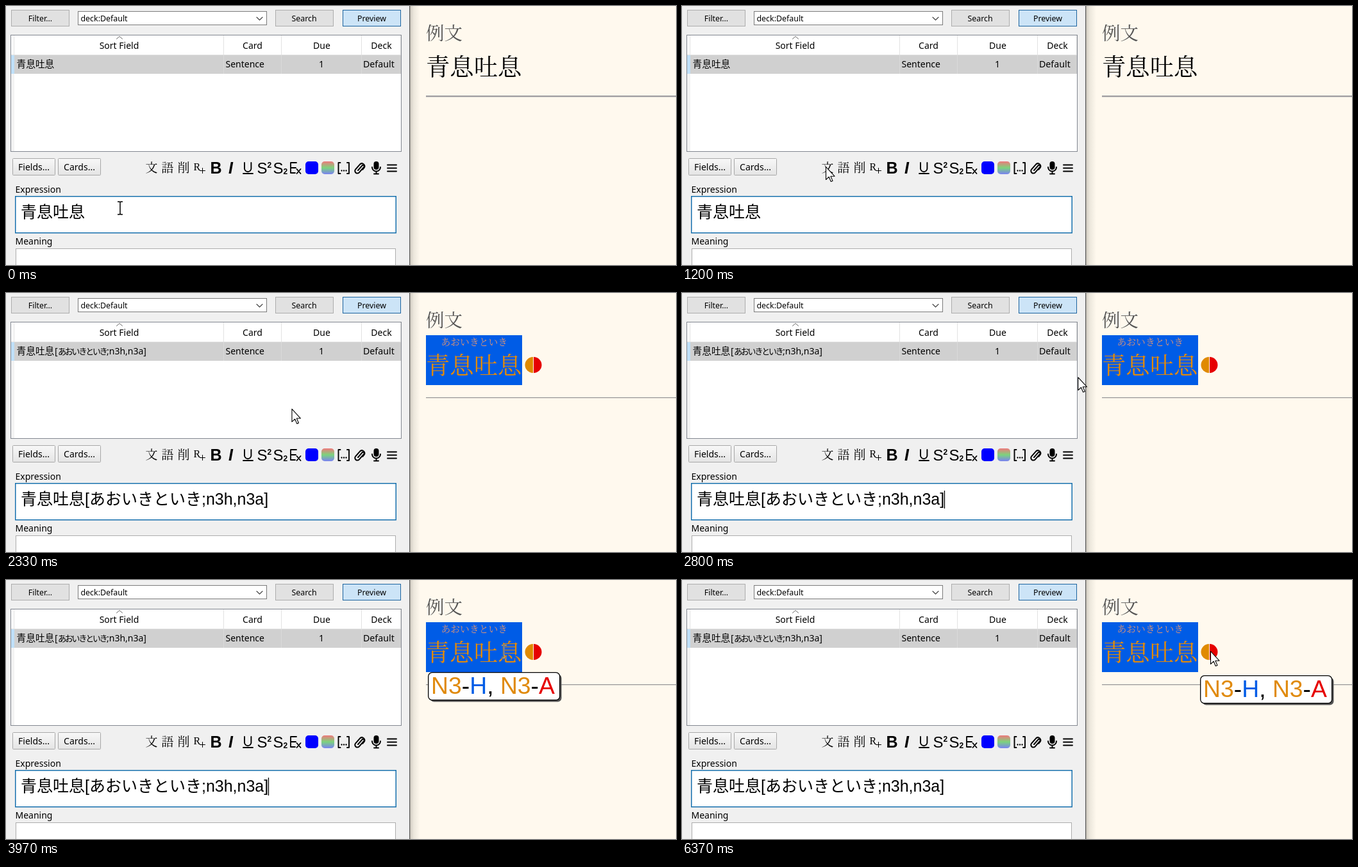
Recreate the animation shown at these times as an HTML page. Size 1045 by 405 pixels, loop 6460 ms.

```html
<!DOCTYPE html>
<html lang="ja">
<head>
<meta charset="utf-8">
<title>Card browser</title>
<style>
  html, body { margin: 0; width: 100%; height: 100%; overflow: hidden; background: #f0f0f0; }
  svg { display: block; width: 1045px; height: 405px; }
  text { font-family: "Noto Sans", "Noto Sans CJK JP", sans-serif; font-size: 14px; fill: #000; }
  .small { font-size: 12.4px; }
  .mid { text-anchor: middle; }
  .field { font: 300 25px "Liberation Sans", "Noto Sans CJK JP", sans-serif; }
  .card { font-family: "Noto Serif CJK JP", "Noto Sans CJK JP", serif; font-size: 37.33px; }
  .icon { font-family: "Liberation Sans", sans-serif; font-size: 24px; }
  .kai { font-family: "Noto Serif CJK JP", "Noto Sans CJK JP", serif; font-size: 19px; }
  .tip { font-family: "Liberation Sans", sans-serif; font-size: 37.33px; }
  .line { fill: none; stroke: #000; stroke-linecap: round; stroke-linejoin: round; }
</style>
</head>
<body>
<svg viewBox="0 0 1045 405">
  <defs>
    <linearGradient id="btn" x2="0" y2="1">
      <stop stop-color="#f8f8f8"/><stop offset="1" stop-color="#e4e4e4"/>
    </linearGradient>
    <linearGradient id="rainbow" x2="0" y2="1">
      <stop stop-color="#f0787c"/><stop offset=".5" stop-color="#7cd47c"/><stop offset="1" stop-color="#7a82f2"/>
    </linearGradient>
    <linearGradient id="shade">
      <stop stop-color="#cfcac0"/><stop offset=".35" stop-color="#ebe6db"/><stop offset="1" stop-color="#fff9ee"/>
    </linearGradient>
  </defs>
  <rect width="1045" height="405" fill="#f0f0f0"/>

  <!-- search bar -->
  <g stroke="#adadad" fill="#e1e1e1">
    <rect x="8.5" y="6.5" width="90" height="25"/>
    <rect x="420.5" y="6.5" width="90" height="25"/>
    <rect x="525.5" y="6.5" width="90" height="25" fill="#cce4f7" stroke="#1c64a0"/>
    <rect x="112.5" y="8.5" width="294" height="21" fill="#fff" stroke="#7a7a7a"/>
  </g>
  <path class="line" d="M391 17.5l4.5 4.5 4.5-4.5" stroke-width="1.1" style="stroke:#444"/>
  <text class="small mid" x="53.5" y="24">Filter...</text>
  <text class="small" x="116.5" y="24">deck:Default</text>
  <text class="small mid" x="465" y="24">Search</text>
  <text class="small mid" x="570.5" y="24">Preview</text>

  <!-- card table -->
  <rect x="7.5" y="45.5" width="609" height="182" fill="#fff" stroke="#828790"/>
  <rect x="8" y="106" width="5" height="121" fill="#f3f3f3"/>
  <rect x="8" y="77" width="608" height="29" fill="#d0d0d0"/>
  <rect x="8" y="77" width="5" height="29" fill="#bfdff8"/>
  <path d="M12.5 46v30M339.5 46v30M429.5 46v30M554.5 46v30M615.5 46v30M8 76.5h608" stroke="#e2e2e2"/>
  <path d="M339.5 77v29M429.5 77v29M554.5 77v29" stroke="#dadada"/>
  <path class="line" d="M172.500 51.500l4.500-4 4.500 4" stroke-width="1" style="stroke:#666"/>
  <text class="mid" x="176.5" y="67">Sort Field</text>
  <text class="mid" x="384.5" y="67">Card</text>
  <text class="mid" x="492.5" y="67">Due</text>
  <text class="mid" x="585.5" y="67">Deck</text>
  <text x="16.500" y="96" style="font-size:14.7px">青息吐息</text>
  <text class="after" y="96"><tspan x="76">[</tspan><tspan x="81" style="font-size:13px;letter-spacing:-2.2px">あおいきといき</tspan><tspan x="157">;n3h,n3a]</tspan></text>
  <text x="342.500" y="96">Sentence</text>
  <text class="mid" x="492" y="96">1</text>
  <text x="557" y="96" style="font-size:14.200px">Default</text>

  <!-- editor toolbar -->
  <g fill="url(#btn)" stroke="#a8a8a8">
    <rect x="10.500" y="238.500" width="66" height="26" rx="1"/>
    <rect x="81.500" y="238.500" width="66" height="26" rx="1"/>
  </g>
  <text class="mid" x="43.500" y="257">Fields...</text>
  <text class="mid" x="114.500" y="257">Cards...</text>
  <text class="kai" x="217.500" y="260">文</text>
  <text class="kai" x="242.500" y="260">語</text>
  <text class="kai" x="267.500" y="260">削</text>
  <text x="292.500" y="257" style="font:16px 'Liberation Serif',serif">R</text>
  <path class="line" d="M302.500 257.500h8M306.500 253.500v8" stroke-width="1"/>
  <text class="icon" x="318.500" y="262" font-weight="bold" style="font-size:25px">B</text>
  <text class="icon" x="347" y="262" style="font:italic bold 25px 'Liberation Sans',sans-serif">I</text>
  <path class="line" d="M372 245v9a5.200 5.200 0 0 0 10.400 0v-9M370 262h15" stroke-width="1.9"/>
  <text class="icon" x="391.500" y="262">S<tspan dy="-9" style="font-size:12px;font-weight:bold">2</tspan></text>
  <text class="icon" x="416.500" y="262">S<tspan dy="1" style="font-size:12px;font-weight:bold">2</tspan></text>
  <path class="line" d="M453 245h-9v16h7M444 253h8M453.500 255l6 7M459.500 255l-6 7" stroke-width="1.800"/>
  <rect x="467" y="243" width="20" height="20" rx="5" fill="#00f"/>
  <rect x="492" y="243" width="20" height="20" rx="5" fill="url(#rainbow)"/>
  <path class="line" d="M521.500 245h-3v17h3M532 245h3v17h-3" stroke-width="1.900"/>
  <path class="line" d="M523.500 257.500h.1M527 257.500h.1M530.500 257.500h.1" stroke-width="2.300"/>
  <path class="line" d="M549 257l6.500-7.500a1.800 1.800 0 0 1 2.700 2.400l-7.400 8.400a3.700 3.700 0 0 1-5.600-4.900l7.300-8.300a4.300 4.300 0 0 1 6.200 5.700l-2.500 3" stroke-width="2"/>
  <rect x="573.500" y="243" width="8" height="13" rx="4"/>
  <path class="line" d="M571 252a6.500 6.500 0 0 0 13 0M577.500 259v3M574 262.500h7" stroke-width="1.900"/>
  <path class="line" d="M595 248.500h14M595 253.500h14M595 258.500h14" stroke-width="1.900"/>

  <!-- fields -->
  <text x="14.500" y="292">Expression</text>
  <rect x="14.750" y="297.750" width="593.500" height="57" fill="#fff" stroke="#1670ad" stroke-width="1.500"/>
  <text class="field" x="23" y="331">青息吐息<tspan class="after">[あおいきといき;n3h,n3a]</tspan></text>
  <rect id="caret" y="309" width="1.300" height="28"/>
  <text x="14.500" y="373">Meaning</text>
  <rect x="15.500" y="379.500" width="592" height="40" fill="#fff" stroke="#adadad"/>

  <!-- preview -->
  <rect x="630" width="415" height="405" fill="#fff9ee"/>
  <rect x="630" width="16" height="405" fill="url(#shade)"/>
  <rect x="629" width="1.300" height="405" fill="#5c5c5c"/>
  <text class="card" x="655" y="53" style="font-size:28.500px;fill:#555">例文</text>
  <g class="before">
    <text class="card" x="655" y="109">青息吐息</text>
    <rect x="655" y="140" width="390" height="2" fill="#9f9da0"/>
    <rect x="655" y="142" width="390" height="1" fill="#dedad6"/>
  </g>
  <g class="after">
    <rect x="655" y="66" width="150" height="78" fill="#005ce6"/>
    <text class="card" x="678.500" y="82" style="font-size:14.800px;fill:#e39672">あおいきといき</text>
    <text class="card" x="655" y="127" style="fill:#e08a0c">青息吐息</text>
    <rect x="655" y="163" width="390" height="1" fill="#989898"/>
    <rect x="655" y="164" width="390" height="1" fill="#e2ded6"/>
    <path d="M822 100a12.500 12.500 0 0 0 0 25z" fill="#e08a00"/>
    <path d="M823 100a12.500 12.500 0 0 1 0 25z" fill="#e60000"/>
  </g>
  <g id="popup">
    <rect x="661.500" y="147.500" width="205" height="43" rx="6" fill="#555"/>
    <rect x="658.700" y="144.700" width="205" height="43" rx="6" fill="#fff" stroke="#000" stroke-width="1.300"/>
    <text class="tip" x="663" y="178"><tspan fill="#e08a0c">N3</tspan>-<tspan fill="#005ce6">H</tspan>, <tspan fill="#e08a0c">N3</tspan>-<tspan fill="#e60000">A</tspan></text>
  </g>

  <!-- pointers -->
  <path id="arrow" d="M.5 .5V20.500L5.200 16.200 8.300 23.500 11 22.400 7.900 15.200H14Z" fill="#fff" stroke="#000" stroke-width="1.100" stroke-linejoin="round"/>
  <path id="beam" d="M-4-10h3l1 1 1-1h3M-4 10h3l1-1 1 1h3M0-9V9" fill="none" stroke="#fff" stroke-width="1.500" style="mix-blend-mode:difference"/>
</svg>
<script>
const LOOP = 6460, INSERT = 1600, BLINK = 524;
// time, x, y of the pointer
const path = [
  [470, 178, 316], [870, 208, 267], [1100, 223, 253], [1200, 224, 251],
  [1710, 224, 251], [2230, 383, 199], [2330, 445, 181], [2900, 642, 126],
  [3230, 697, 117], [3570, 737, 113], [4230, 799, 112], [4530, 817, 110], [4770, 824, 111]
];
const $ = id => document.getElementById(id);
const caret = $("caret"), popup = $("popup"), arrow = $("arrow"), beam = $("beam");
const before = document.querySelectorAll(".before"), after = document.querySelectorAll(".after");

const show = (el, on) => el.setAttribute("visibility", on ? "visible" : "hidden");
const move = (el, x, y) => el.setAttribute("transform", `translate(${x} ${y})`);

function slope(i, axis) {
  if (i < 1 || i > path.length - 2) return 0;
  const rate = k => (path[k + 1][axis] - path[k][axis]) / (path[k + 1][0] - path[k][0]);
  const a = rate(i - 1), b = rate(i);
  return a * b > 0 ? 2 * a * b / (a + b) : 0;
}

// monotone cubic through the path points
function along(t, axis) {
  const last = path.length - 1;
  if (t <= path[0][0]) return path[0][axis];
  if (t >= path[last][0]) return path[last][axis];
  const i = path.findIndex(p => p[0] > t) - 1;
  const p = path[i], q = path[i + 1], d = q[0] - p[0], u = (t - p[0]) / d, v = 1 - u;
  return v * v * (1 + 2 * u) * p[axis] + u * u * (3 - 2 * u) * q[axis]
    + d * u * v * (v * slope(i, axis) - u * slope(i + 1, axis));
}

function caretOn(t) {
  if (t < 500 || t >= 6370) return false;
  return t > 5800 || Math.floor((t - INSERT) / BLINK) % 2 === 0;
}

function draw(t) {
  const inserted = t >= INSERT;
  before.forEach(el => show(el, !inserted));
  after.forEach(el => show(el, inserted));

  const x = along(t, 1), y = along(t, 2);
  const onWord = x >= 655 && x < 805, onDot = x >= 807;
  const typing = onWord || y > 297;
  show(arrow, !typing);
  show(beam, typing);
  move(arrow, x, y);
  move(beam, Math.round(x), Math.round(y));

  show(popup, onWord || onDot);
  move(popup, onDot ? 150 : 0, onDot ? 5 : 0);

  show(caret, caretOn(t));
  caret.setAttribute("x", inserted ? 408.800 : 122.800);
}

const start = performance.now();
function tick() {
  draw((performance.now() - start) % LOOP);
  requestAnimationFrame(tick);
}
tick();
</script>
</body>
</html>
```
